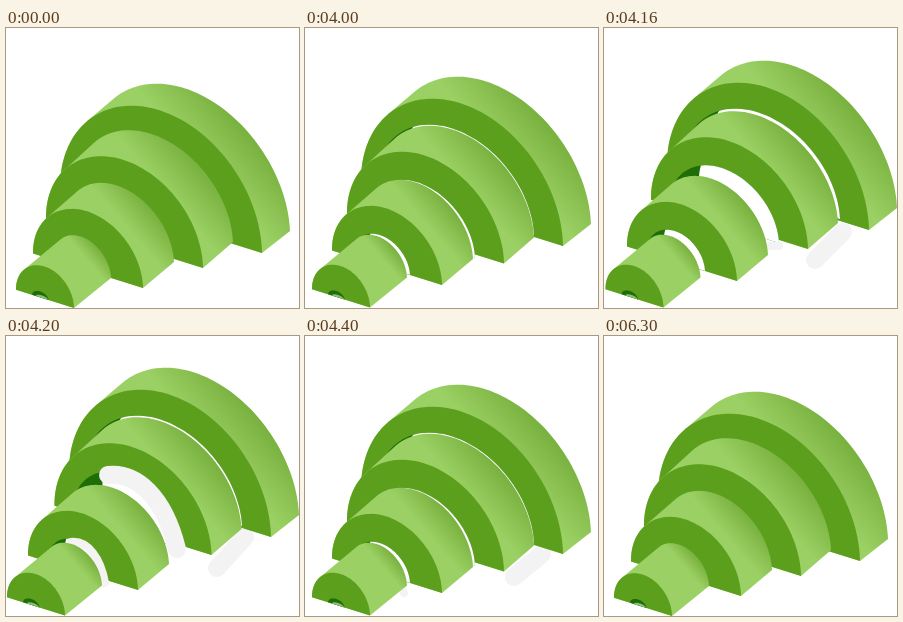
An HTML page that plays this animation: 293 px wide and 280 px high, repeating every 7.5 s.

```html
<!DOCTYPE html>
<html lang="en">
<head>
<meta charset="utf-8">
<title>Nested arches</title>
<style>
  html, body { margin: 0; width: 100%; height: 100%; overflow: hidden; background: #fff; }
  svg { display: block; width: 100%; height: 100%; }
</style>
</head>
<body>
<svg id="stage" viewBox="0 0 293 280"></svg>
<script>
const SLOPE = 0.313, FRONT_LEAN = 0.02, BACK_LEAN = 0.05;
const FACE = '#5c9f1d', WALL = '#1f6d06', LIGHT = '#9bd164', SHADE = '#79b13f', TRAIL = '#f3f3f3';

// foot: front right corner, r/h: half width and height, depth: extrusion,
// moves: offsets for the closed, loose, open and widest poses
const arches = [
  { foot: [68, 280], r: 29, h: 32.5, depth: [37, -30],
    moves: [[0, 0], [-3, -0.5], [-8.5, -0.5], [-9, -0.5]] },
  { foot: [137, 260], r: 55, h: 59.5, depth: [31, -26], wall: [17, -13],
    moves: [[0, 0], [0, -3], [-4, -7], [-5, -6]] },
  { foot: [197, 240], r: 78.5, h: 83.7, depth: [30, -26],
    moves: [[0, 0], [2, -4.5], [7, -19], [8.5, -21]] },
  { foot: [256, 225], r: 101, h: 111.3, depth: [28, -22],
    moves: [[0, 0], [2, -7], [9, -23], [9, -24]] }
];

// Pale trails left on the floor, per pose; "under" names the arch drawn above it
const trails = [
  { pose: 'back', under: 3, d: 'M209 241L237 218', w: 18 },
  { pose: 'back', under: 0, d: 'M97 252L99 257', w: 8 },
  { pose: 2, under: 3, d: 'M211 232L239 204', w: 18 },
  { pose: 2, under: 1, d: 'M166 218L175 218', w: 8 },
  { pose: 3, under: 3, d: 'M211 232L239 201', w: 18 },
  { pose: 3, under: 1, d: 'M102 139C130 136 158 160 171 213', w: 18 },
  { pose: 3, under: 0, d: 'M65 206C82 204 95 223 99 247', w: 8 }
];

const stage = document.getElementById('stage');

function add(parent, tag, attrs) {
  const el = document.createElementNS('http://www.w3.org/2000/svg', tag);
  for (const key in attrs) el.setAttribute(key, attrs[key]);
  return parent.appendChild(el);
}

const outline = pts => 'M' + pts.map(p => p.map(v => v.toFixed(2)).join(' ')).join('L') + 'Z';
const sum = (p, q) => [p[0] + q[0], p[1] + q[1]];

// Half ellipse over a sloping base; its upright axis leans to the left
function arc({ foot, r, h }, from, to, lean = FRONT_LEAN) {
  return Array.from({ length: 61 }, (_, i) => {
    const t = from + (to - from) * i / 60;
    const across = r * (Math.cos(t) - 1), up = Math.sin(t);
    return [foot[0] + across - lean * r * up, foot[1] + SLOPE * across - h * up];
  });
}

const backArc = (a, from, to) => arc(a, from, to, BACK_LEAN).map(p => sum(p, a.depth));

// Angle at which an arc runs parallel to the extrusion
function tangent({ r, h, depth: [dx, dy] }, lean) {
  return Math.atan2(dx * h - dy * lean * r, r * (dy - SLOPE * dx));
}

function bodyPath(a) {
  return outline([
    ...backArc(a, 0, tangent(a, BACK_LEAN)),
    ...arc(a, tangent(a, FRONT_LEAN), Math.PI),
    a.foot
  ]);
}

function addGradient(a, i) {
  const id = 'skin' + i;
  const [x, y] = backArc(a, 0, Math.PI / 4)[60];
  const span = a.r * 0.55;
  const grad = add(stage, 'linearGradient', { id, gradientUnits: 'userSpaceOnUse',
    x1: x, y1: y, x2: x - span * 0.76, y2: y + span * 0.65 });
  add(grad, 'stop', { offset: 0, 'stop-color': SHADE });
  add(grad, 'stop', { offset: 1, 'stop-color': LIGHT });
  return `url(#${id})`;
}

// The opening is a little lower than the back of the arch nested in it
function addHole(parent, a, i) {
  const inner = arches[i - 1];
  const rim = backArc({ ...inner, h: inner.h - 1.5 }, 0, Math.PI);
  const beyond = rim.map(p => sum(p, a.wall || a.depth));
  const left = beyond[beyond.length - 1];
  const path = outline(rim);
  add(add(stage, 'clipPath', { id: 'rim' + i }), 'path', { d: path });
  const hole = add(parent, 'g', {});
  add(hole, 'path', { d: path, fill: WALL });
  add(hole, 'path', { d: outline([...beyond, [left[0], 300], [beyond[0][0], 300]]),
    fill: '#fff', 'clip-path': `url(#rim${i})` });
  return hole;
}

function addNotch(parent) {
  const notch = { foot: [42.5, 272], r: 8.2, h: 6 };
  const glint = { foot: [42, 271.8], r: 6, h: 2.5 };
  add(parent, 'path', { d: outline(arc(notch, 0, Math.PI)), fill: WALL });
  add(parent, 'path', { d: outline(arc(glint, 0, Math.PI)), fill: '#8fbd78' });
}

for (let i = arches.length - 1; i >= 0; i--) {
  const a = arches[i];
  for (const t of trails.filter(t => t.under === i)) {
    t.el = add(stage, 'path', { d: t.d, fill: 'none', stroke: TRAIL,
      'stroke-width': t.w, 'stroke-linecap': 'round' });
  }
  const skin = addGradient(a, i);
  a.el = add(stage, 'g', {});
  add(a.el, 'path', { d: bodyPath(a), fill: skin });
  add(a.el, 'path', { d: outline(arc(a, 0, Math.PI)), fill: FACE });
  if (i) a.hole = addHole(a.el, a, i);
  else addNotch(a.el);
}

const LOOP = 7500, START = 4000, STEP = 100;
const sequence = [1, 2, 3, 2, 1];

function draw(time) {
  const step = Math.floor((time % LOOP - START) / STEP);
  const pose = sequence[step] || 0;
  const key = step === 4 ? 'back' : pose;
  for (const a of arches) {
    a.el.setAttribute('transform', `translate(${a.moves[pose]})`);
    if (a.hole) a.hole.setAttribute('display', pose ? 'inline' : 'none');
  }
  for (const t of trails) t.el.setAttribute('display', t.pose === key ? 'inline' : 'none');
}

const begin = performance.now();
function tick() {
  draw(performance.now() - begin);
  requestAnimationFrame(tick);
}
tick();
</script>
</body>
</html>
```
